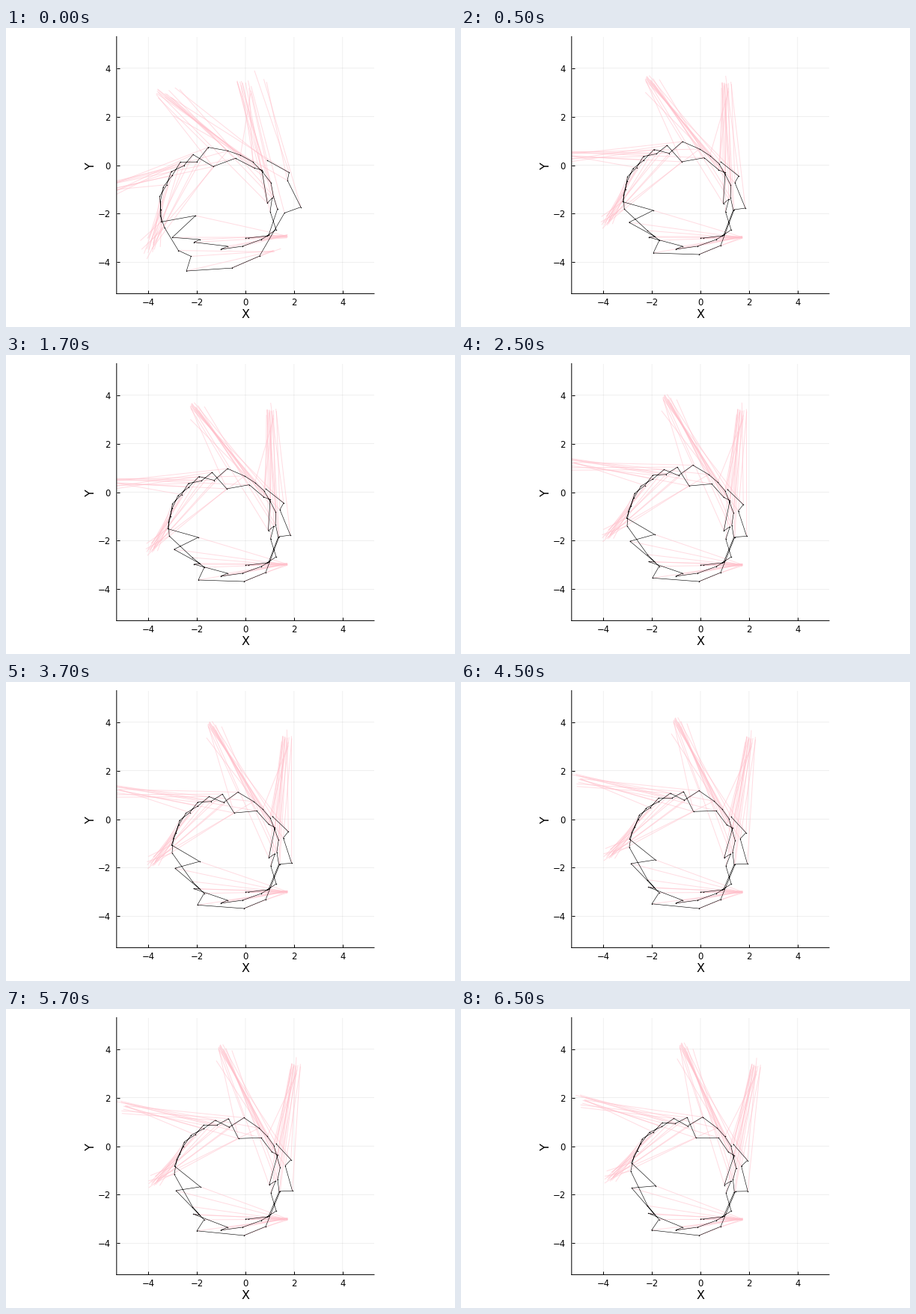
A matplotlib script that plays this animation: 600 by 400 pixels, repeating every 8 s.

```python
import numpy as np
import matplotlib.pyplot as plt
from matplotlib.animation import FuncAnimation
from matplotlib.collections import LineCollection

W, H, DPI = 600, 400, 100
PX = 72 / DPI
LEFT, RIGHT, TOP, BOTTOM = 147.8, 492, 11.5, 355.4
ORIGIN_X, ORIGIN_Y, UNIT = 320, 183.6, 32.45

# Stage positions are complex numbers, x + y*1j, with y pointing down.
START = 320 + 281j
CENTER = 287 + 230j
LANDMARKS = [195 + 259j, 135 + 168j, 249 + 70j, 352 + 73j, 376 + 280j]
VIEW_RANGE, VIEW_COS = 195, 0.42

plt.rcParams["font.family"] = "DejaVu Sans"


def arc(start, stop, count, radius, zigzag, decay):
    """Counter-clockwise steps round the lap, swinging in and out."""
    radii = radius + zigzag * (-decay) ** np.arange(count)
    return CENTER + radii * np.exp(-1j * np.radians(np.linspace(start, stop, count)))


def reach(offset):
    """How strongly a correction acts at this offset from the start: 0 to 1."""
    t = np.clip((np.abs(offset) - 30) / 95, 0, 1)
    return t * t * (3 - 2 * t)


def correct(z, amount):
    """Swing the map about the start, more on the left and farther out."""
    offset = z - START
    weight = reach(offset)
    side = offset.real / np.maximum(np.abs(offset), 1)
    angle = np.radians(11 - 4 * side) * weight * amount
    scale = 1 + 0.04 * weight * max(amount, 0)
    return START + offset * scale * np.exp(1j * angle)


def visible(z, mark):
    heading = -1j * (z - CENTER) / abs(z - CENTER)
    view = mark - z
    ahead = (view * heading.conjugate()).real / abs(view)
    return abs(view) < VIEW_RANGE and ahead > VIEW_COS


tail = np.array([249 + 271j, 265 + 284j, 257 + 301j, 318 + 303j, 347 + 291j,
                 365 + 243j, 380 + 241j, 366 + 207j, 371 + 198j, 347 + 179j])
path = np.concatenate([
    [START, 324 + 281j, 349 + 278j, 361 + 270j,
     353.5 + 246j, 358 + 229j, 350.5 + 235j, 353 + 193.5j],
    arc(35, 56, 2, 69, 1, 1),
    [295 + 179j],
    arc(99, 182, 7, 70, 4, 0.8),
    [257 + 244j, 224.5 + 260j, 259 + 279j, 251 + 280j, 296 + 292j,
     287 + 296j, 316 + 292j, 341 + 283j, 351 + 277j],
    arc(-10, 65, 7, 75, 3, 0.6),
    [296 + 152j],
    arc(98, 190, 7, 70, -7, 0.5),
    tail])

# Odometry error that builds up on the last stretch of the drive.
swing = np.tanh(np.arange(len(tail)) - 4.5)
drift = np.zeros(len(path), complex)
drift[-len(tail):] = 18 * swing + 1j * (10 - 9 * swing)

rng = np.random.RandomState(4)
pairs = [(i, mark) for mark in LANDMARKS
         for i, z in enumerate(path) if visible(z, mark)]
seen = np.array([i for i, _ in pairs])
marks = np.array([mark for _, mark in pairs])
noise = rng.standard_t(3, (len(pairs), 2)).clip(-5, 5) @ [1, 1j]
noise *= 3.2 * reach(marks - START)


def xy(z):
    return np.stack([z.real, z.imag], axis=-1)


def make_state(amount, drift_share=0, noise_gain=1):
    poses = correct(path, amount) + drift * drift_share
    ends = correct(marks + noise * noise_gain, amount) + drift[seen] * drift_share
    return xy(poses), np.stack([xy(poses[seen]), xy(ends)], axis=1)


# After the raw drive, each optimiser step leaves 57 % of the error before it.
settled = 1 - 0.57 ** np.arange(4)
STATES = [make_state(-1, 1, 1.6)] + [make_state(a) for a in settled / settled[-1]]

fig = plt.figure(figsize=(W / DPI, H / DPI), dpi=DPI, facecolor="white")
ax = fig.add_axes([LEFT / W, 1 - BOTTOM / H, (RIGHT - LEFT) / W, (BOTTOM - TOP) / H])
ax.set_xlim(LEFT, RIGHT)
ax.set_ylim(BOTTOM, TOP)
ax.set_axisbelow(True)
ax.spines[["top", "right"]].set_visible(False)
for side in ("left", "bottom"):
    ax.spines[side].set(linewidth=PX, snap=False)

values = range(-4, 5, 2)
labels = [str(v).replace("-", "\u2212") for v in values]
ax.set_xticks([ORIGIN_X + UNIT * v for v in values], labels)
ax.set_yticks([ORIGIN_Y - UNIT * v for v in values], labels)
ax.tick_params(direction="in", length=4 * PX, width=PX, labelsize=11.6 * PX)
ax.tick_params(axis="x", pad=6 * PX)
ax.tick_params(axis="y", pad=8 * PX)
ax.grid(color="black", alpha=0.1, linewidth=0.6 * PX, snap=False)
label_style = dict(size=16 * PX, ha="center", va="center")
fig.text(320 / W, 1 - 384 / H, "X", **label_style)
fig.text(113.5 / W, 1 - 184 / H, "Y", rotation=90, **label_style)

rays = LineCollection([], colors="pink", linewidths=PX, alpha=0.55, zorder=2)
ax.add_collection(rays, autolim=False)
track, = ax.plot([], [], color="black", linewidth=0.6 * PX, marker="o",
                 markersize=1.4 * PX, markeredgewidth=0, zorder=3)


def update(n):
    poses, segments = STATES[(n + 3) // 4]
    rays.set_segments(segments)
    track.set_data(poses[:, 0], poses[:, 1])
    return rays, track


anim = FuncAnimation(fig, update, frames=16, interval=500, repeat=True)
plt.show()
```
